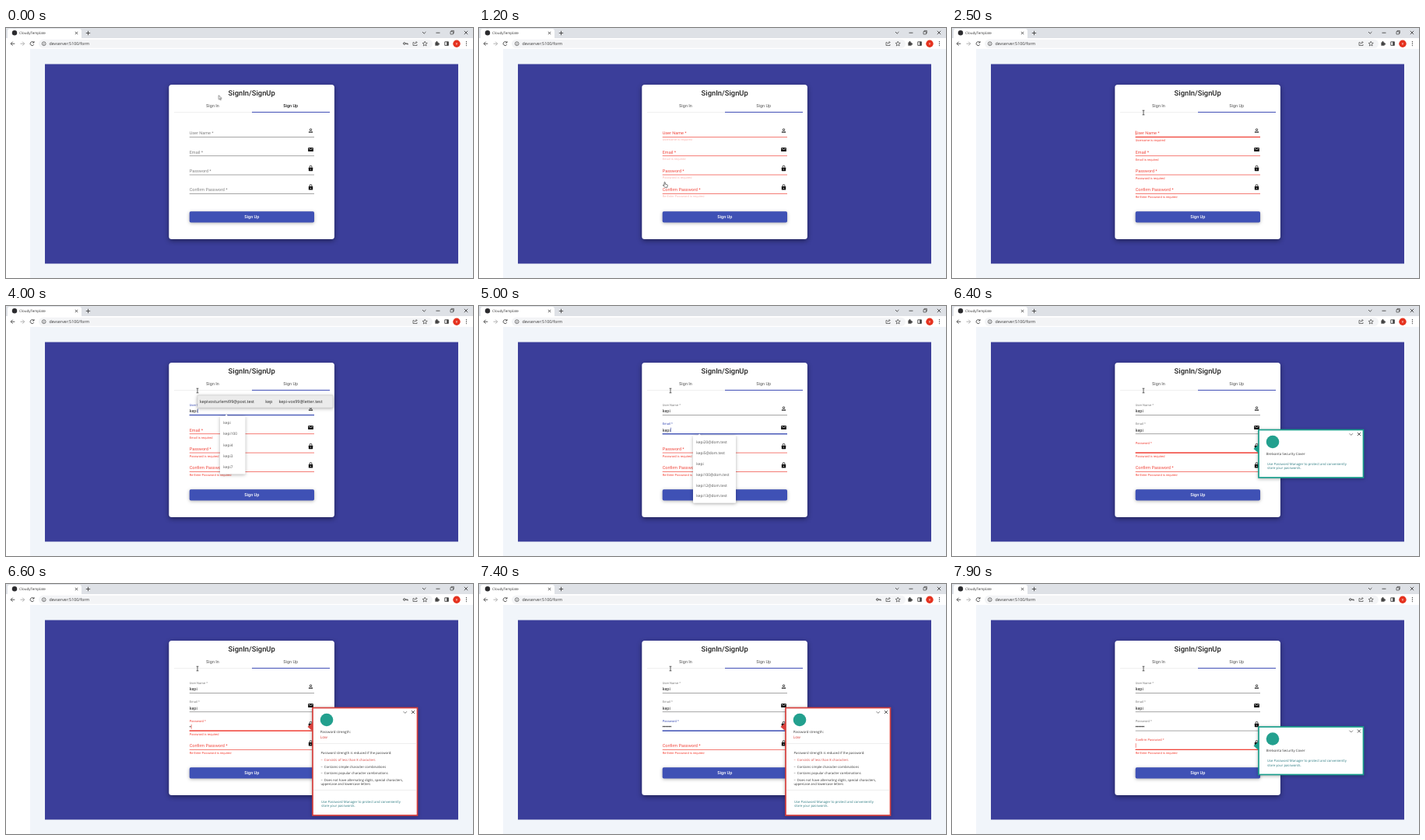
Recreate the animation shown at these times as an HTML page. Size 600 by 322 pixels, loop 8000 ms.

```html
<!DOCTYPE html>
<html lang="en">
<head>
<meta charset="utf-8">
<title>Sign up form</title>
<style>
  html, body { margin: 0; width: 100%; height: 100%; overflow: hidden; background: #fff; }
  svg { display: block; width: 100vw; height: 100vh; }
  text { font-family: Roboto, sans-serif; font-size: 5.5px; text-rendering: geometricPrecision; white-space: pre; }
  .ui { font-family: "Open Sans", sans-serif; }
  .mid { text-anchor: middle; font-weight: 500; }
  .line { fill: none; stroke: #444; stroke-width: .9; }
  .error { font-size: 4.05px; fill: #f44336; }
  .caret { animation: blink 1s step-end infinite; }
  .shadow { filter: drop-shadow(0 1px 2px rgba(0, 0, 0, .3)); }
  .card { filter: drop-shadow(0 2px 3px rgba(0, 0, 0, .45)); }
  @keyframes blink { 0% { opacity: 1 } 5.5% { opacity: 0 } 45%, to { opacity: 1 } }
</style>
</head>
<body>
<svg id="stage" viewBox="0 0 600 322" preserveAspectRatio="none"></svg>
<script>
const LOOP = 8000;
const GREY = '#808080', RED = '#f0443a', BLUE = '#3f51b5', TEAL = '#1a9f8c', ALERT = '#d8403c';

// ---- Timeline: every track becomes a CSS keyframes rule ----
const rules = [], animations = {};

function track(target, prop, stops, ease = 'step-end') {
  const name = 'k' + rules.length;
  const frames = stops.map(([ms, value]) => `${ms / LOOP * 100}%{${prop}:${value}}`);
  frames.push(`to{${prop}:${stops.at(-1)[1]}}`);
  rules.push(`@keyframes ${name}{${frames.join('')}}`);
  (animations[target] ||= []).push(`${name} ${LOOP}ms ${ease} infinite`);
}

function show(target, from, to) {
  const stops = [[from, 'visible']];
  if (from > 0) stops.unshift([0, 'hidden']);
  if (to) stops.push([to, 'hidden']);
  track(target, 'visibility', stops);
}

function fade(target, ...stops) {
  track(target, 'opacity', stops, 'linear');
}

// ---- Drawing helpers ----
const rect = (x, y, w, h, fill, more = '') =>
  `<rect x="${x}" y="${y}" width="${w}" height="${h}" fill="${fill}" ${more}/>`;
const text = (x, y, str, more = '') => `<text x="${x}" y="${y}" ${more}>${str}</text>`;
const ui = (x, y, str, size, fill = '#333') =>
  text(x, y, str, `class="ui" fill="${fill}" style="font-size:${size}px"`);
const line = (d, more = '') => `<path class="line" d="${d}" ${more}/>`;
const group = (id, body, more = '') => `<g id="${id}" ${more}>${body}</g>`;
const cross = (x, y, r) => line(`M${x - r} ${y - r}l${2 * r} ${2 * r}m0 ${-2 * r}l${-2 * r} ${2 * r}`);

function browser() {
  return rect(0, 0, 600, 14, '#dee1e6') +
    '<path d="M2 13.5V4q0-3 3-3h89q3 0 3 3v9.5z" fill="#fff"/>' +
    rect(0, 13, 600, 14.5, '#fff') +
    rect(42, 14.8, 506, 11, '#f3f4f6', 'rx="5.5"') +
    '<circle cx="11" cy="6.3" r="3.2" fill="#2b2b2e"/>' +
    ui(17, 8.3, 'CloudyTemplate', 4.5) +
    cross(90.5, 6.5, 1.6) + line('M105.5 3.8v5.4m-2.7-2.7h5.4') +
    line('M535 5l2.2 2.2L539.400 5M552.500 6.200h5M588.800 3.800l4.400 4.400m0-4.400l-4.400 4.400') +
    line('M571 4.600h3.400v3.400h-3.400zM572 4.400v-1h3.400v3.400h-1', 'style="stroke-width:.7"') +
    line('M11.300 20.200H6.200m2.400-2.500l-2.500 2.500 2.500 2.500') +
    line('M18.500 20.200h5.100m-2.400-2.500l2.500 2.500-2.500 2.500', 'style="stroke:#aaa"') +
    line('M35.500 18.400a2.500 2.500 0 1 0 .4 2.800M36 17v2h-2') +
    '<circle class="line" cx="48.700" cy="20.200" r="2.400" style="stroke-width:.7"/>' +
    line('M48.700 19.900v1.600m0-2.700v.6', 'style="stroke-width:.7"') +
    ui(55.500, 22.200, 'devserver:5100/form', 5.3) +
    group('key', '<circle class="line" cx="511.800" cy="20" r="1.300"/>' + line('M513 20h3.200v1.500M515 20v1.200')) +
    line('M524.500 18.500h-1.500v4h5v-1.500M524.800 21q0-2.500 3-2.500m-1.200-1.500l1.500 1.500-1.500 1.500', 'style="stroke-width:.7"') +
    line('M538.200 17.200l.9 2 2.200.2-1.700 1.400.5 2.200-1.900-1.200-1.900 1.200.5-2.200-1.700-1.400 2.200-.2z', 'style="stroke-width:.7"') +
    rect(551.4, 18.5, 4.2, 4.2, '#444') +
    '<circle cx="553.500" cy="18.200" r="1.100" fill="#444"/><circle cx="556" cy="20.600" r="1.100" fill="#444"/>' +
    line('M563.800 17.800h4.600v4.600h-4.600z') + rect(566.2, 17.8, 2.2, 4.6, '#444') +
    '<circle cx="579" cy="20.200" r="4.700" fill="#e5321f"/>' +
    text(579, 21.7, 'Y', 'class="mid" fill="#fff" style="font-size:4px"') +
    [17.8, 20.2, 22.6].map(y => `<circle cx="591.500" cy="${y}" r=".7" fill="#444"/>`).join('');
}

// ---- Form ----
const icons = {
  person: '<g fill="none" stroke="#222" stroke-width=".8"><circle cy="-1.300" r="1.200"/>' +
    '<path d="M-2.300 2.300V1.700Q-2 .7 0 .7T2.300 1.700V2.300z"/></g>',
  mail: rect(-3.4, -2.6, 6.8, 5.2, '#111', 'rx=".6"') +
    '<path d="M-2.800-1.700L0 .1 2.800-1.700" fill="none" stroke="#fff" stroke-width=".7"/>',
  lock: rect(-2.7, -1.1, 5.4, 4.5, '#111', 'rx=".6"') +
    '<path d="M-1.400-1V-2.100a1.400 1.400 0 0 1 2.800 0V-1" fill="none" stroke="#111" stroke-width=".8"/>' +
    '<circle cy="1.200" r=".6" fill="#fff"/>'
};

const fields = [
  { label: 'User Name', error: 'Username', icon: 'person', focus: 2450, blur: 4300, valid: 2800,
    word: 'kepi', keys: [2800, 3000, 3200, 3500], steps: [2.8, 5.7, 8.8, 10.3] },
  { label: 'Email', error: 'Email', icon: 'mail', focus: 4300, blur: 5810, valid: 4600,
    word: 'kepi', keys: [4600, 4700, 4850, 5000], steps: [2.8, 5.7, 8.8, 10.3] },
  { label: 'Password', error: 'Password', icon: 'lock', focus: 5810, blur: 7600, valid: 6650,
    keys: [6500, 6700, 6850, 7000, 7150, 7300], steps: [2, 3.9, 5.8, 7.7, 9.6, 11.5] },
  { label: 'Confirm Password', error: 'Re-Enter Password', icon: 'lock', focus: 7600, keys: [], steps: [] }
];

function field(f, i) {
  const { focus, blur, valid, keys, steps, word } = f;
  const id = part => `${part}${i}`;
  const floatAt = i ? focus : 2500;
  const rest = 'translate(0px,-3px) scale(1)', up = 'translate(0px,-11.2px) scale(.75)';

  track(id('tint'), 'color', [[0, GREY], [1080, RED], ...(valid ? [[valid, BLUE], [blur, GREY]] : [])]);
  track(id('label'), 'transform', [[0, rest], [floatAt, rest], [floatAt + 400, up]], 'cubic-bezier(.25,.8,.25,1)');
  track(id('error'), 'transform', [[0, 'translateY(-2px)'], [1000, 'translateY(-2px)'], [1300, 'none']], 'ease-in');
  track(id('error'), 'opacity', [[0, 0], [1000, 0], [1300, 1]], 'cubic-bezier(.55,0,.55,.2)');
  if (valid) show(id('error'), 0, valid);
  show(id('bar'), focus, blur);
  show(id('caret'), focus, blur);
  track(id('caret'), 'transform', [[0, 'none'], ...keys.map((ms, k) => [ms, `translateX(${steps[k]}px)`])]);
  keys.forEach((ms, k) => show(`typed${i}${k}`, ms));

  const typed = word
    ? text(0, -3, [...word].map((c, k) => `<tspan id="typed${i}${k}">${c}</tspan>`).join(''), 'fill="#222"')
    : keys.map((_, k) => `<circle id="typed${i}${k}" cx="${1 + 1.92 * k}" cy="-5.300" r=".8" fill="#222"/>`).join('');

  return `<g transform="translate(235.700 ${140.3 + 24.3 * i})">` +
    group(id('tint'),
      rect(0, -.2, 160.3, .7, 'currentColor') +
      group(id('bar'), rect(0, -.5, 160.3, 1.3, 'currentColor')) +
      text(0, 0, f.label + ' *', `id="${id('label')}" fill="currentColor"`) +
      group(id('caret'), rect(0, -8, .6, 5.8, 'currentColor', 'class="caret"'))) +
    typed +
    text(0, 6.1, f.error + ' is required', `id="${id('error')}" class="error"`) +
    `<g transform="translate(155.800 -8.100)">${icons[f.icon]}</g></g>`;
}

function page() {
  track('signup', 'fill', [[0, '#222'], [1050, '#777']]);
  return rect(0, 27, 31, 295, '#fff') + rect(31, 27, 569, 295, '#f1f5fa') +
    rect(50, 46.5, 531, 257, '#3b3e9a') +
    rect(209.3, 73, 212.6, 199, '#fff', 'rx="3.500" class="card"') +
    text(315.7, 86.9, 'SignIn/SignUp', 'class="mid" fill="#222" style="font-size:9.400px"') +
    text(265.5, 102, 'Sign In', 'class="mid" fill="#777"') +
    text(365.7, 102, 'Sign Up', 'class="mid" id="signup"') +
    rect(216, 108.6, 200, .5, '#ddd') + rect(316, 107.9, 100, 1.1, '#4f5cbd') +
    fields.map(field).join('') +
    rect(235.700, 236.2, 160.3, 14.3, BLUE, 'rx="1.800" class="shadow"') +
    text(315.8, 245.3, 'Sign Up', 'class="mid" fill="#fff"');
}

// ---- Overlays ----
function dropdown(id, y, width, pitch, rows) {
  const height = rows.length * pitch + 4;
  return group(id,
    `<path d="M281 ${y}l2.200-2.400 2.200 2.400z" fill="#fff"/>` +
    rect(275, y, width, height, '#fff', 'rx="1"') +
    rows.map((r, k) => ui(279.3, y + 10.3 + k * pitch, r, 4.85, '#555')).join(''), 'class="shadow"');
}

function suggestions(id, y) {
  return `<g transform="translate(246 ${y})">` + group(id,
    rect(0, 0, 174, 16, '#ebebeb', 'stroke="#c8c8c8" stroke-width=".5"') +
    ui(3, 10.4, 'kepivosturlemi99@post.test', 5.4, '#222') +
    ui(87.3, 10.4, 'kep', 5.4, '#222') +
    ui(104.6, 10.4, 'kepi-vos99@letter.test', 5.4, '#222'), 'class="shadow"') + '</g>';
}

function popup(id, y, height, color, body) {
  return `<g transform="translate(394 ${y})">` + group(id,
    rect(0, 0, 134.5, height, '#fff', `stroke="${color}" stroke-width="1.700" class="shadow"`) +
    `<path d="M0 19L-6.500 24.500 0 30z" fill="${color}"/>` +
    '<circle cx="18" cy="15.500" r="8.300" fill="#23a08e"/>' +
    line('M116.600 4.700l2.200 2.200 2.200-2.200', 'style="stroke-width:.7"') + cross(129, 5.5, 2) + body) + '</g>';
}

const advice = y =>
  ui(11, y, 'Use Password Manager to protect and conveniently', 4.25, '#2b7a80') +
  ui(11, y + 5.2, 'store your passwords.', 4.25, '#2b7a80');
const product = ui(9.7, 32.4, 'Brelvanta Security Cover', 4.4) + advice(45.4);

const strength =
  ui(9.7, 32.4, 'Password strength:', 4.4) + ui(9.7, 39.5, 'Low', 4.9, ALERT) +
  rect(1, 46, 132.5, .5, '#ddd') +
  ui(10.5, 59.5, 'Password strength is reduced if the password:', 4.25) +
  ['Consists of less than 8 characters', 'Contains simple character combinations',
    'Contains popular character combinations', 'Does not have alternating digits, special characters,']
    .map((s, k) => ui(10.5, 68.4 + 8.6 * k, '–  ' + s, 4.25, k ? '#333' : ALERT)).join('') +
  ui(10.5, 99.6, 'uppercase and lowercase letters', 4.25) +
  rect(1, 106, 132.5, .5, '#ddd') + advice(122.6);

function overlays() {
  fade('names', [0, 0], [2880, 0], [2980, 1], [4300, 1], [4480, 0]);
  fade('mails', [0, 0], [4680, 0], [4780, 1], [5800, 1], [6000, 0]);
  [['bar-name', 3180, 4300], ['bar-mail', 5180, 5800]].forEach(([id, from, to]) => {
    show(id, from, to);
    track(id, 'transform', [[0, 'translateY(11px)'], [from, 'translateY(11px)'], [from + 200, 'none']], 'ease-out');
  });
  show('offer', 5850, 6500);
  show('weak', 6500, 7620);
  show('offer-again', 7760);
  return dropdown('names', 142, 32.5, 14.1, ['kepi', 'kepi100', 'kepi4', 'kepi3', 'kepi7']) +
    dropdown('mails', 167, 55, 13.8,
      ['kepi20@dom.test', 'kepi5@dom.test', 'kepi', 'kepi100@dom.test', 'kepi12@dom.test', 'kepi13@dom.test']) +
    suggestions('bar-name', 115) + suggestions('bar-mail', 139.3) +
    popup('offer', 159.5, 61.5, TEAL, product) +
    popup('weak', 159.5, 138.5, ALERT, strength) +
    popup('offer-again', 184, 61.5, TEAL, product);
}

function pointer() {
  const path = [[0, 273.3, 86.6], [100, 273.3, 86.6], [450, 256, 146], [800, 240, 199], [900, 240, 199],
    [980, 238, 239], [1100, 238, 239], [1190, 238, 198], [1300, 238, 198], [1800, 246, 132],
    [2330, 246, 132], [2480, 246, 109]];
  track('pointer', 'transform', path.map(([ms, x, y]) => [ms, `translate(${x}px,${y}px)`]), 'linear');
  show('arrow', 0, 980);
  show('hand', 980, 1400);
  show('beam', 1400);
  return group('pointer',
    '<path id="arrow" d="M0 0V5.400L1.300 4.300 2.200 6.200 3 5.800 2.200 4H3.900z" fill="#fff" stroke="#222" stroke-width=".5"/>' +
    '<path id="hand" d="M0 .8q.6-.9 1.200 0V3l2.700.8q.5.200.4 1L3.800 7.300H.8L-1.600 4.600q0-.7.7-.5L0 4.800z" ' +
      'fill="#fff" stroke="#222" stroke-width=".6"/>' +
    line('M-1.400-2.800h2.800M0-2.800v5.600M-1.400 2.800h2.800', 'id="beam" style="stroke:#222;stroke-width:.7"'));
}

show('key', 6500);
animations.key = [];
track('key', 'visibility', [[0, 'visible'], [1000, 'hidden'], [6500, 'visible']]);

document.getElementById('stage').innerHTML = browser() + page() + overlays() + pointer();

const sheet = document.createElement('style');
sheet.textContent = rules.join('\n') +
  Object.entries(animations).map(([id, list]) => `#${id}{animation:${list.join()}}`).join('\n');
document.head.append(sheet);
</script>
</body>
</html>
```
